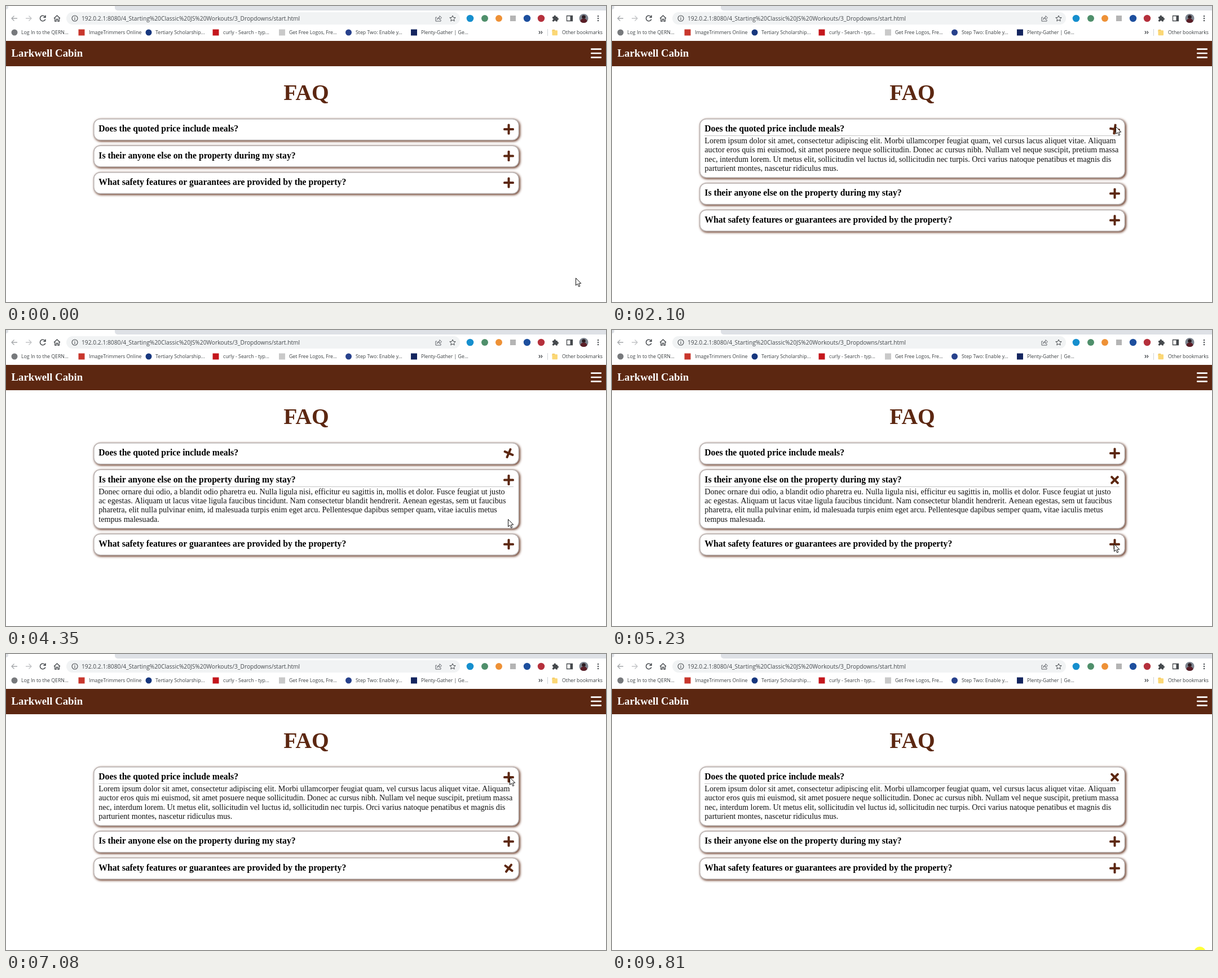
An HTML page with a canvas for the animation above (9900 ms loop, 1064 by 526 pixels).

```html
<!DOCTYPE html>
<html lang="en">
<head>
<meta charset="utf-8">
<title>FAQ accordion</title>
<style>
html, body { margin: 0; width: 100%; height: 100%; overflow: hidden; background: #fff; }
canvas { display: block; }
</style>
</head>
<body>
<canvas id="stage" width="1064" height="526"></canvas>
<script>
const ctx = document.getElementById('stage').getContext('2d');
const LOOP = 9900, BROWN = '#5c2711', INK = '#45494d';
const SERIF = '"Liberation Serif", "Times New Roman", serif';
const SANS = '"Open Sans", "Noto Sans", sans-serif';

const cards = [
  { title: 'Does the quoted price include meals?', lines: [
    'Lorem ipsum dolor sit amet, consectetur adipiscing elit. Morbi ullamcorper feugiat quam, vel cursus lacus aliquet vitae. Aliquam',
    'auctor eros quis mi euismod, sit amet posuere neque sollicitudin. Donec ac cursus nibh. Nullam vel neque suscipit, pretium massa',
    'nec, interdum lorem. Ut metus elit, sollicitudin vel luctus id, sollicitudin nec turpis. Orci varius natoque penatibus et magnis dis',
    'parturient montes, nascetur ridiculus mus.'] },
  { title: 'Is their anyone else on the property during my stay?', lines: [
    'Donec ornare dui odio, a blandit odio pharetra eu. Nulla ligula nisi, efficitur eu sagittis in, mollis et dolor. Fusce feugiat ut justo',
    'ac egestas. Aliquam ut lacus vitae ligula faucibus tincidunt. Nam consectetur blandit hendrerit. Aenean egestas, sem ut faucibus',
    'pharetra, elit nulla pulvinar enim, id malesuada turpis enim eget arcu. Pellentesque dapibus semper quam, vitae iaculis metus',
    'tempus malesuada.'] },
  { title: 'What safety features or guarantees are provided by the property?', lines: [
    'Pellentesque sagittis libero ante, non bibendum nisi condimentum sed. Duis nec nisi metus. Proin sed pharetra purus, id sagittis',
    'neque. In ut aliquet turpis, ut molestie leo. Vestibulum ante ipsum primis in faucibus orci luctus et ultrices posuere cubilia curae;',
    'Fusce nec risus porta, vestibulum elit sed, malesuada enim. Pellentesque consequat enim ornare ipsum bibendum, vitae auctor',
    'eros auctor. Ut laoreet nec justo vel aliquet.'] }
];

// click time, card that opens, start of its icon's turn
const clicks = [[2100, 0, 2025], [4220, 1, 4730], [5510, 2, 6000], [7080, 0, 7665]];

// pointer moves: first step, last step, number of steps, end point
const moves = [
  [70, 130, 2, 992, 470], [330, 470, 3, 927, 382], [660, 800, 3, 908, 263],
  [990, 1400, 7, 893, 214], [3060, 3330, 5, 902, 270], [3400, 3670, 5, 890, 336],
  [4740, 5170, 7, 891, 387], [5230, 5230, 1, 890, 380], [5900, 6140, 4, 893, 306],
  [6530, 6730, 3, 887, 250], [6800, 6880, 2, 893, 219], [8170, 8400, 4, 971, 433],
  [8580, 9120, 9, 1027, 527], [9540, 9540, 1, 1033, 524], [9610, 9610, 1, 1034, 530]
];

function ease(x) {
  if (x <= 0) return 0;
  if (x >= 1) return 1;
  let lo = 0, hi = 1, u = 0.5;
  for (let i = 0; i < 22; i++) {
    u = (lo + hi) / 2;
    const bx = 0.75 * u * (1 - u) + u * u * u;
    if (bx < x) lo = u; else hi = u;
  }
  return 0.3 * u * (1 - u) ** 2 + 3 * u * u * (1 - u) + u ** 3;
}

function tilt(card, t) {
  let angle = 0;
  clicks.forEach(([at, opened, spin], k) => {
    if (t < at) return;
    const now = at + Math.floor((t - at) / 69) * 69;
    if (opened === card) angle = ease((now - spin) / 500);
    else if (k && clicks[k - 1][1] === card) angle = 1 - ease((now - at + 75) / 500);
  });
  return angle * Math.PI / 4;
}

function pointerAt(t) {
  let x = 1010, y = 483;
  for (const [from, to, n, ex, ey] of moves) {
    if (t < from) break;
    const step = n > 1 ? Math.floor((t - from) / (to - from) * (n - 1) + 1e-6) : 0;
    const p = Math.min(1, (step + 1) / n);
    x += (ex - x) * p;
    y += (ey - y) * p;
  }
  return [x, y];
}

function text(str, x, y, font, color, align = 'left') {
  ctx.font = font;
  ctx.fillStyle = color;
  ctx.textAlign = align;
  ctx.fillText(str, x, y);
}

function rect(x, y, w, h, color, r = 0) {
  ctx.fillStyle = color;
  ctx.beginPath();
  ctx.roundRect(x, y, w, h, r);
  ctx.fill();
}

function disc(x, y, r, color) {
  ctx.fillStyle = color;
  ctx.beginPath();
  ctx.arc(x, y, r, 0, 7);
  ctx.fill();
}

function line(d, color = INK, width = 1.3) {
  ctx.strokeStyle = color;
  ctx.lineWidth = width;
  ctx.stroke(new Path2D(d));
}

function mark(round, x, y, color, half) {
  if (round) disc(x, y, half, color);
  else rect(x - half, y - half, half * 2, half * 2, color);
}

function drawToolbar() {
  rect(0, 0, 1064, 62, '#fff');
  rect(193, 0, 871, 8, '#dee1e6', [0, 0, 0, 5]);
  rect(0, 0, 4, 6, '#dee1e6', [0, 0, 4, 0]);

  line('M20 22H10M14.5 17.5L10 22L14.5 26.5', '#a5a8ab');
  line('M35 22H45M40.5 17.5L45 22L40.5 26.5', '#c2c4c6');
  line('M69.2 19.2A4.8 4.8 0 1 0 69.8 23.4M70 16.5V20.2H66.3', INK, 1.5);
  line('M85 22L90.5 17L96 22M86.7 21V27H89.2V23.5H91.8V27H94.3V21');

  rect(107, 11, 698, 22, '#f1f3f4', 11);
  line('M127 22A5 5 0 1 1 117 22A5 5 0 1 1 127 22M122 21.3V25M122 19V20.3', INK, 1.1);
  text('192.0.2.1:8080/4_Starting%20Classic%20JS%20Workouts/3_Dropdowns/start.html',
    134, 25.7, '10.24px ' + SANS, INK);
  line('M764 20H762V27H771V24.5M764.5 24Q765 20 769 20V17.5L772.5 21L769 24.3V22Q766 22 764.5 24Z', '#5f6368', 1);
  line('M792 17L793.5 20.4L797.2 20.7L794.4 23.2L795.2 26.8L792 24.9L788.8 26.8L789.6 23.2L786.8 20.7L790.5 20.4Z', INK, 1);

  mark(true, 823, 22, '#168fce', 6.3);
  mark(true, 849, 22, '#4f8f6b', 6);
  mark(true, 874, 22, '#ee9136', 6);
  mark(false, 899, 22, '#b4b4b4', 5);
  mark(true, 924, 22, '#1d4f9e', 6.2);
  mark(true, 949, 22, '#b5303c', 6.2);

  rect(969, 19, 9, 8.5, INK, 1);
  disc(973.3, 18.3, 1.8, INK);
  disc(978.3, 23, 1.8, INK);
  disc(969, 23.3, 1.4, '#fff');
  disc(973.5, 27.3, 1.4, '#fff');
  line('M994.5 17.5H1004.5V26.5H994.5Z');
  rect(1000.5, 17.5, 4, 9, INK);

  ctx.save();
  ctx.beginPath();
  ctx.arc(1024.5, 22, 8, 0, 7);
  ctx.clip();
  rect(1016, 14, 17, 17, '#7d8590');
  disc(1024.5, 19.5, 3.3, '#2b1d22');
  rect(1018.5, 22.5, 12, 10, '#5a1d26', 5);
  ctx.restore();
  for (const y of [18, 22, 26]) disc(1050, y, 1.2, INK);
}

function drawBookmarks() {
  const items = [
    ['Log In to the QERN...', 27, 15, true, '#77797c'],
    ['ImageTrimmers Online', 147, 134, false, '#c8372d'],
    ['Tertiary Scholarship...', 265, 253, true, '#17377e'],
    ['curly - Search - typ...', 385, 372, false, '#c4161c'],
    ['Get Free Logos, Fre...', 502, 489.5, false, '#c9c9c9'],
    ['Step Two: Enable y...', 620, 607.5, true, '#27418c'],
    ['Plenty-Gather | Ge...', 736, 723.5, false, '#14255f']
  ];
  const font = '8.75px ' + SANS;
  for (const [label, x, ix, round, color] of items) {
    mark(round, ix, 47, color, 5.5);
    text(label, x, 50.3, font, '#3c4043');
  }
  line('M945 44.5L947.2 47L945 49.5M948.6 44.5L950.8 47L948.6 49.5', INK, 1.2);
  line('M960.5 41V53', '#d0d3d6', 1);
  rect(968.5, 42, 5, 4, '#eec25b', 1);
  rect(968.5, 43.2, 9.5, 9, '#fbd775', 1);
  text('Other bookmarks', 986, 50.3, font, '#3c4043');
}

function drawHeader() {
  rect(0, 62, 1064, 45, BROWN);
  text('Larkwell Cabin', 9.5, 90, 'bold 18.75px ' + SERIF, '#fff');
  for (const y of [75.3, 82.7, 90.1]) rect(1037, y, 19, 2.6, '#fff', 1);
  text('FAQ', 532.5, 166.5, 'bold 39.5px ' + SERIF, BROWN, 'center');
}

function drawCard(card, top, open, angle) {
  const h = open ? 105.7 : 39;
  ctx.save();
  ctx.shadowColor = BROWN;
  ctx.shadowBlur = 4;
  ctx.shadowOffsetX = ctx.shadowOffsetY = 1.6;
  rect(155, top, 755, h, '#b9b2b1', 12);
  ctx.restore();
  rect(156.5, top + 1.5, 752, h - 3, '#fff', 10.5);

  text(card.title, 164.3, top + 23, 'bold 15.68px ' + SERIF, '#000');
  if (open) {
    rect(164, Math.round(top + 30), 736, 1, '#c4c4c4');
    card.lines.forEach((str, i) =>
      text(str, 164.3, top + 44 + i * 16.4, '14.13px ' + SERIF, '#111'));
  }

  ctx.save();
  ctx.translate(891.5, top + 19);
  ctx.rotate(angle);
  rect(-9.4, -2, 18.8, 4, BROWN, 1.5);
  rect(-2, -9.4, 4, 18.8, BROWN, 1.5);
  ctx.restore();
}

function drawPointer(x, y) {
  ctx.save();
  ctx.translate(x + 0.5, y + 0.5);
  const arrow = new Path2D('M0 0V13L3 10.3L5.2 15.2L7.3 14.3L5.2 9.5H9.3Z');
  ctx.fillStyle = '#fff';
  ctx.fill(arrow);
  ctx.strokeStyle = '#111';
  ctx.lineWidth = 1;
  ctx.stroke(arrow);
  ctx.restore();
}

function draw(t) {
  rect(0, 0, 1064, 526, '#fff');
  drawToolbar();
  drawBookmarks();
  drawHeader();

  let open = -1, top = 200;
  for (const [at, card] of clicks) if (t >= at) open = card;
  cards.forEach((card, i) => {
    drawCard(card, top, i === open, tilt(i, t));
    top += i === open ? 114.2 : 47.5;
  });

  if (t >= 9810) disc(1042.5, 530.5, 10.5, '#ffff3c');
  else drawPointer(...pointerAt(t));
}

function frame() {
  draw(performance.now() % LOOP);
  requestAnimationFrame(frame);
}
frame();
</script>
</body>
</html>
```
